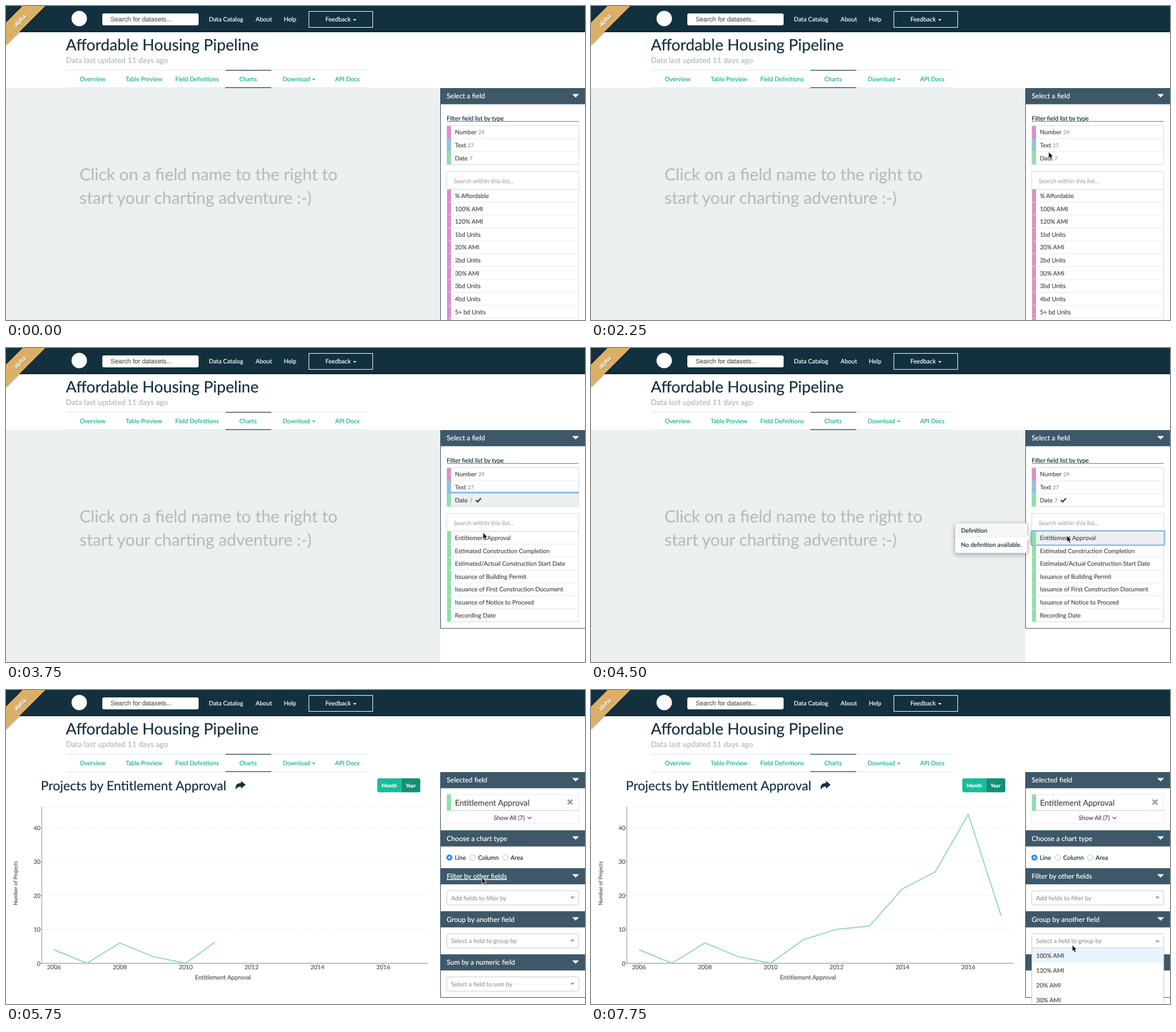
Write an HTML page that moves like this. It is 1016 by 551 pixels and loops after 8000 ms.

```html
<!DOCTYPE html>
<html lang="en">
<head>
<meta charset="utf-8">
<title>Dataset charts</title>
<style>
  html, body { margin: 0; width: 100%; height: 100%; overflow: hidden; background: #fff; }
  svg { display: block; width: 100%; height: 100%; font-family: Lato, "Open Sans", sans-serif; }
  text { white-space: pre; text-rendering: geometricPrecision; stroke-width: .2px; }
</style>
</head>
<body>
<svg id="stage" viewBox="0 0 1016 551" xmlns="http://www.w3.org/2000/svg"></svg>
<script>
const LOOP = 8000, STEP = 250;
const NAVY = '#13303f', SLATE = '#3e5869', GREEN = '#16b287', GREY = '#999', INK = '#4a4a4a';
const PINK = '#de8fc4', BLUE = '#90c2de', MINT = '#8fdfab', EDGE = '#c9dbe6', RULE = '#e6eaed';
const FRAME = '#334f62', FOCUS = '#7fb5ef';
const ROW = 22.62;

const text = (x, y, s, fill = INK, size = 10.6, more = '') =>
  `<text x="${x}" y="${y}" fill="${fill}" stroke="${fill}" font-size="${size}" ${more}>${s}</text>`;
const box = (x, y, w, h, fill, more = '') =>
  `<rect x="${x}" y="${y}" width="${w}" height="${h}" fill="${fill}" ${more}/>`;
const line = (x1, y1, x2, y2, stroke, w = 1, more = '') =>
  `<path d="M${x1} ${y1}L${x2} ${y2}" stroke="${stroke}" stroke-width="${w}" ${more}/>`;
const shape = (d, fill, more = '') => `<path d="${d}" fill="${fill}" ${more}/>`;
const down = (x, y, w, h, fill) => shape(`M${x} ${y}h${w}l${-w / 2} ${h}z`, fill);
const group = (id, body) => `<g id="${id}">${body}</g>`;
const MID = 'text-anchor="middle"';

function header() {
  const tabs = [[129.5, 'Overview'], [210, 'Table Preview'], [297, 'Field Definitions'],
    [409.5, 'Charts'], [485.5, 'Download'], [577.5, 'API Docs']];
  return box(0, 0, 1016, 46, NAVY) + box(0, 43.5, 1016, 2.5, '#0e2735') +
    '<circle cx="128.5" cy="22" r="13.5" fill="#fff"/>' +
    box(169, 13, 169, 21, '#fff', 'rx="3"') +
    text(183.5, 27, 'Search for datasets...', '#5c5c5c', 11.3, 'font-family="Liberation Sans, Arial, sans-serif"') +
    [[356, 'Data Catalog'], [438, 'About'], [487.5, 'Help'], [560.5, 'Feedback']]
      .map(([x, s]) => text(x, 27, s, '#fff')).join('') +
    box(531.5, 9.5, 112, 28, 'none', 'stroke="#fff"') + down(609, 23, 6, 3, '#fff') +
    shape('M0 29L29 0H69L0 69z', '#dbb066', 'style="filter:drop-shadow(0 0 1.5px #0008)"') +
    text(0, 0, 'alpha', '#0005', 10.6, `font-weight="bold" ${MID} transform="translate(28 28.5) rotate(-45)"`) +
    text(0, 0, 'alpha', '#fff', 10.6, `font-weight="bold" ${MID} transform="translate(27 28) rotate(-45)"`) +
    text(105, 78, 'Affordable Housing Pipeline', NAVY, 27.7) +
    text(105, 100.3, 'Data last updated 11 days ago', '#b4b8bb', 13.55) +
    line(105, 112.5, 635, 112.5, '#dfe4e6') + line(105, 143.5, 635, 143.5, '#dfe4e6') +
    line(385, 112.7, 465.5, 112.7, '#3d566a', 1.5) + line(385, 143.3, 465.5, 143.3, '#3d566a', 1.5) +
    tabs.map(([x, s]) => text(x, 132, s, GREEN)).join('') + down(537, 127.5, 6, 3, GREEN);
}

const panelHead = (y, s, id = '') => box(763, y, 253, 28.4, SLATE) +
  text(773.3, y + 18.3, s, '#fff', 12.08, id && `id="${id}"`) + down(993.5, y + 10.6, 12, 6, '#fff');

function fieldRows(names, color, top) {
  return names.map((s, i) => {
    const y = top + i * ROW;
    return box(774, y, 7, ROW, color) + (i ? line(777, y, 1005, y, RULE) : '') + text(787.7, y + 15.4, s);
  }).join('');
}

function picker() {
  const types = [['Number', 29, PINK, 828.7], ['Text', 27, BLUE, 810], ['Date', 7, MINT, 813.2]];
  const numbers = ['% Affordable', '100% AMI', '120% AMI', '1bd Units', '20% AMI', '2bd Units',
    '30% AMI', '3bd Units', '4bd Units', '5+ bd Units', ''];
  const dates = ['Entitlement Approval', 'Estimated Construction Completion',
    'Estimated/Actual Construction Start Date', 'Issuance of Building Permit',
    'Issuance of First Construction Document', 'Issuance of Notice to Proceed', 'Recording Date'];
  const top = 321.6;
  return box(0, 144, 762, 407, '#ecf0f1') +
    text(129, 305.5, 'Click on a field name to the right to', '#bbb', 29.35) +
    text(129, 346.5, 'start your charting adventure :-)', '#bbb', 29.35) +
    panelHead(144, 'Select a field') +
    text(773.3, 200.6, 'Filter field list by type', NAVY) + line(774, 202.5, 1005, 202.5, '#6d757a') +
    group('dateHover', box(781, 255.5, 224, 22.5, '#eceff0')) +
    types.map(([s, n, c, x], i) => {
      const y = 210.3 + i * ROW;
      return box(774, y, 7, ROW, c) + (i ? line(781, y, 1005, y, RULE) : '') +
        text(787.7, y + 15.1, s) + text(x, y + 15.1, n, GREY, 9.5);
    }).join('') +
    box(773.5, 210, 231.5, 68.3, 'none', `stroke="${EDGE}"`) +
    group('dateRing', box(774, 252.2, 231, 3, '#8abaee')) +
    group('check', '<path d="M824.4 266.8l3.3 3.2 5.8-6.5" fill="none" stroke="#444" stroke-width="2.5"/>') +
    group('numberList', fieldRows(numbers, PINK, top) + line(1004.8, top, 1004.8, 551, EDGE) +
      line(762.5, 144, 762.5, 551, FRAME)) +
    group('dateList', box(762, 492, 254, 59, '#fff') +
      group('rowHover', box(781, top, 224, ROW + 1, '#eceff0')) + fieldRows(dates, MINT, top) +
      line(1004.8, top, 1004.8, 480.4, EDGE) + line(774, 480.4, 1005, 480.4, EDGE) +
      shape('M762.5 144V492H1016', 'none', `stroke="${FRAME}"`)) +
    box(773.5, 290.5, 231.5, 31, '#fff', `stroke="${EDGE}"`) +
    text(785.5, 310.8, 'Search within this list...', '#a3abb0') +
    group('rowRing', box(772.7, 320.8, 233.8, 25.2, 'none', `rx="2" stroke="${FOCUS}" stroke-width="2.2"`)) +
    group('tip', shape('M642.5 307H762a4 4 0 0 1 4 4V327l6 6-6 6V356a4 4 0 0 1-4 4H642.5a4 4 0 0 1-4-4V311a4 4 0 0 1 4-4z',
      '#fff', 'stroke="#bdbdbd" style="filter:drop-shadow(0 3px 4px #0004)"') +
      shape('M639 331.5V311a3.5 3.5 0 0 1 3.5-3.5H762a3.5 3.5 0 0 1 3.5 3.5V331.5z', '#f7f7f7') +
      line(639, 332, 765.5, 332, '#ebebeb') +
      text(649.3, 323.6, 'Definition', NAVY) + text(649.3, 349, 'No definition available.', NAVY));
}

const select = (y, s) => box(773.5, y, 231.5, 25, '#fff', 'rx="2.5" stroke="#c4c8ca"') +
  text(781, y + 16.4, s, GREY) + down(990, y + 10.3, 8, 4, GREY);

function builder() {
  const radios = [[778, 'Line'], [819, 'Column'], [876, 'Area']];
  return text(61, 175.5, 'Projects by Entitlement Approval', NAVY, 22.7) +
    shape('M420.5 166.3L412.3 159.5V163.3C405 163.3 402 167.5 403.2 175C405 171 408 169.4 412.3 169.4V173.3z', NAVY) +
    shape('M693.5 155H654.5a3 3 0 0 0-3 3V176.5a3 3 0 0 0 3 3H693.5z', '#18bc9c') +
    shape('M693.5 155H724a3 3 0 0 1 3 3V176.5a3 3 0 0 1-3 3H693.5z', '#128f76') +
    text(672.5, 170.5, 'Month', '#fff', 9.06, `font-weight="bold" ${MID}`) +
    text(710, 170.5, 'Year', '#fff', 9.06, `font-weight="bold" ${MID}`) +
    shape('M762.5 144V539.5H1016', 'none', `stroke="${FRAME}"`) +
    panelHead(144, 'Selected field') +
    box(773.5, 211.5, 231.5, 23.5, '#fff', 'stroke="#e8e8e8"') +
    box(773.5, 183.5, 231.5, 28, '#fff', 'stroke="#dfe6ea"') + line(774, 211.5, 1005, 211.5, EDGE, 1.5) +
    box(774, 183, 7, 28.5, MINT) + text(787.7, 202.7, 'Entitlement Approval', INK, 14.15) +
    '<path d="M985.6 192.4l8.4 8.4m0-8.4l-8.4 8.4" stroke="#a0a0a0" stroke-width="3"/>' +
    text(855.7, 227.6, 'Show All (7)') +
    '<path d="M915.2 222.6l3.4 3.4 3.4-3.4" fill="none" stroke="#555" stroke-width="1.3"/>' +
    panelHead(246.2, 'Choose a chart type') +
    radios.map(([x, s], i) => (i
      ? `<circle cx="${x}" cy="294" r="4.8" fill="#fff" stroke="#b9b9b9"/>`
      : `<circle cx="${x}" cy="294" r="5.3" fill="#2f8cf7"/><circle cx="${x}" cy="294" r="1.9" fill="#fff"/>`) +
      text(x + 9.6, 298, s, NAVY)).join('') +
    panelHead(312.6, 'Filter by other fields', 'filterHead') + select(352.2, 'Add fields to filter by') +
    panelHead(388.2, 'Group by another field') + select(427.8, 'Select a field to group by') +
    panelHead(463.8, 'Sum by a numeric field') + select(503.4, 'Select a field to sum by') +
    group('chart', chart()) + group('menu', menu());
}

function chart() {
  const counts = [4, 0, 6, 2, 0, 7, 10, 11, 22, 27, 44, 14];
  const px = i => 84.2 + i * 57.78, py = v => 479.5 - v * 5.94;
  const dots = 'stroke-dasharray="2 2"';
  let out = line(63, 206, 741, 206, '#e6e6e6', 1, dots);
  for (let v = 0; v <= 40; v += 10) {
    if (v) out += line(63, py(v), 741, py(v), '#e6e6e6', 1, dots);
    out += line(60.5, py(v), 63, py(v), '#8a8a8a') + text(60.5, py(v) + 4, v, '#555', 10.6, 'text-anchor="end"');
  }
  for (let i = 0; i < 12; i += 2)
    out += line(px(i), 479.5, px(i), 482.5, '#8a8a8a') + text(px(i), 489.8, 2006 + i, '#555', 10.6, MID);
  return out + line(62.8, 205, 62.8, 480, '#8a8a8a') + line(62, 479.5, 741, 479.5, '#8a8a8a') +
    text(380.7, 508.4, 'Entitlement Approval', '#555', 10.6, MID) +
    text(0, 0, 'Number of Projects', '#555', 9.15, `${MID} transform="translate(20.3 339) rotate(-90)"`) +
    '<clipPath id="wipe"><rect id="wipeBox" x="63" y="200" height="285" width="0"/></clipPath>' +
    `<polyline clip-path="url(#wipe)" points="${counts.map((v, i) => px(i) + ',' + py(v)).join(' ')}"
      fill="none" stroke="${MINT}" stroke-width="2" stroke-linejoin="round"/>`;
}

function menu() {
  return box(773.5, 453, 231.5, 110, '#fff', 'stroke="#c4c8ca"') + box(774, 453, 230.5, 26, '#e8f3fb') +
    box(988, 436, 12, 8, '#fff') + shape('M990 442.2h8l-4-4z', GREY) +
    ['100% AMI', '120% AMI', '20% AMI', '30% AMI']
      .map((s, i) => text(781.3, 469.8 + i * 26.2, s)).join('');
}

const stage = document.getElementById('stage');
stage.innerHTML = group('picker', picker()) + group('builder', builder()) + header() +
  group('cursor', shape('M0 0V11.4L2.6 9 4.5 13.3 6.6 12.4 4.7 8.2H8.2z', '#000',
    'stroke="#fff" stroke-width=".9" stroke-linejoin="round"'));

// When each part is visible: [from, to] in ms
const spans = {
  picker: [0, 4750], builder: [4750, LOOP], cursor: [1250, LOOP],
  dateHover: [2500, 4000], dateRing: [3000, 4000], check: [3250, 4750],
  numberList: [0, 3250], dateList: [3250, 4750],
  rowHover: [4000, 4750], rowRing: [4250, 4750], tip: [4000, 4750],
  chart: [5000, LOOP], menu: [7500, LOOP]
};
// Pointer stops: time, x, y
const stops = [[1250, 410, 400], [1750, 560, 345], [2000, 730, 280], [2250, 803, 256], [2500, 803, 262],
  [3500, 820, 290], [3750, 837, 324], [4000, 835, 329], [6750, 842, 400], [7000, 844.5, 447.5]];
const part = id => document.getElementById(id);

function draw(now) {
  const t = Math.floor((now % LOOP) / STEP) * STEP;
  for (const id in spans)
    part(id).style.display = t >= spans[id][0] && t < spans[id][1] ? '' : 'none';
  const stop = stops.filter(s => s[0] <= t).pop() || stops[0];
  part('cursor').setAttribute('transform', `translate(${stop[1]} ${stop[2]})`);
  part('filterHead').setAttribute('text-decoration', t < 6750 ? 'underline' : 'none');
  const p = Math.min(1, Math.max(0, (t - 5050) / 1500));
  part('wipeBox').setAttribute('width', 678 * (0.5 - Math.cos(Math.PI * p) / 2));
}

const start = performance.now();
function tick() {
  draw(performance.now() - start);
  requestAnimationFrame(tick);
}
tick();
</script>
</body>
</html>
```
